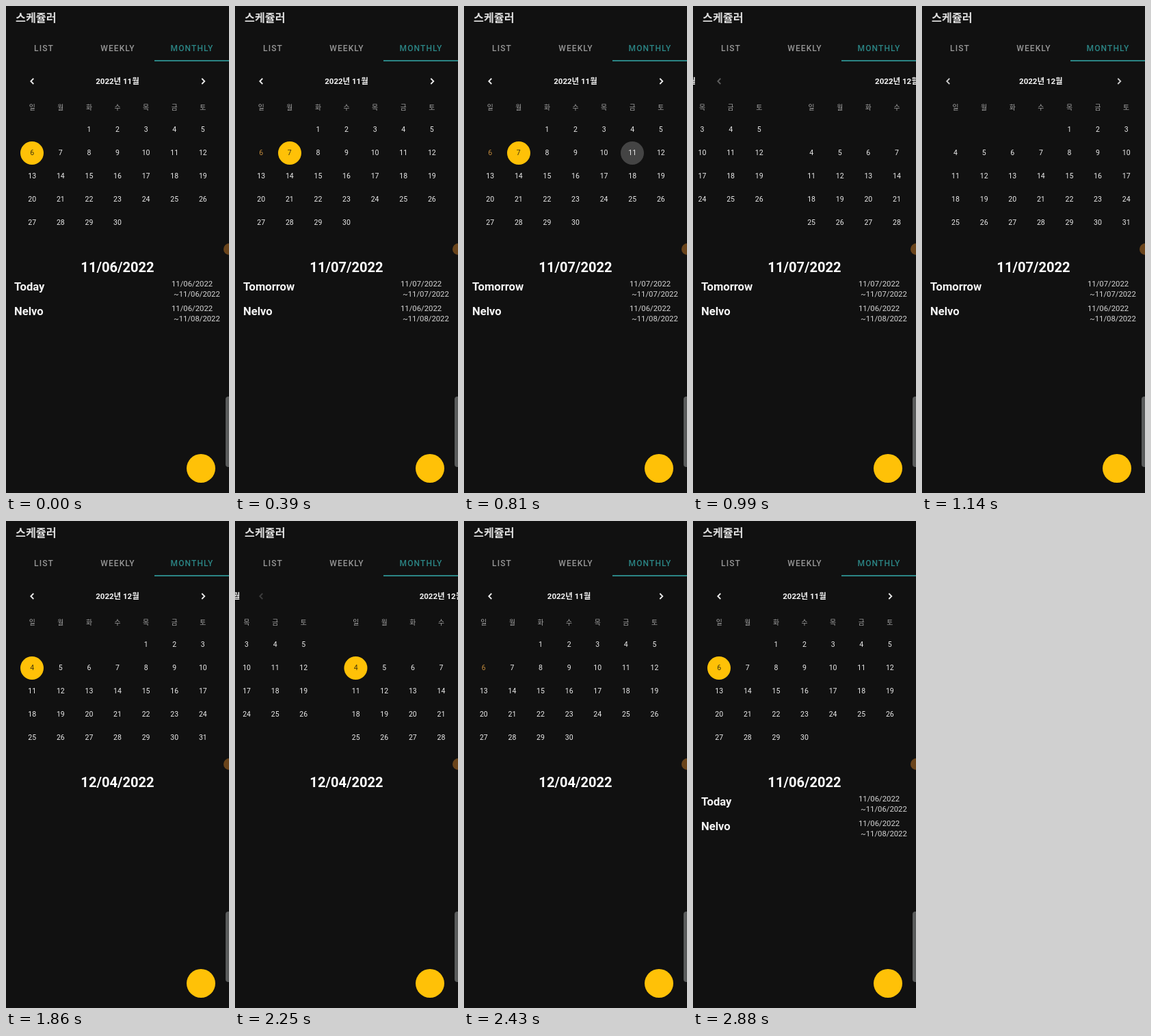
These frames come from a looping animation (326x712 px, 3330 ms). An HTML page:

```html
<!DOCTYPE html>
<html lang="ko">
<head>
<meta charset="utf-8">
<title>스케쥴러</title>
<style>
  html, body { margin: 0; width: 100%; height: 100%; overflow: hidden; background: #111; }
  body {
    --loop: 3330ms;
    --amber: #ffc107;
    --teal: #2b8585;
    position: relative;
    font-family: Roboto, "Noto Sans CJK KR", "Noto Sans CJK", sans-serif;
    color: #f4f4f4;
  }
  #stage { position: absolute; left: 0; top: 0; width: 326px; height: 712px; overflow: hidden; }
  #stage div, .cell, .pick, .press { position: absolute; white-space: nowrap; }

  .app { left: 14px; top: 7px; font-size: 16.2px; line-height: 22px; font-weight: 700; color: #dedede; }
  .tab { top: 52px; width: 109px; line-height: 20px; text-align: center; font-size: 12px; font-weight: 500; letter-spacing: 1.1px; color: #979797; }
  .tab.active { color: var(--teal); }
  .bar { left: 217px; top: 79px; width: 109px; height: 2px; background: var(--teal); }

  .track { left: 0; top: 90px; width: 652px; height: 250px; animation: swipe var(--loop) infinite; }
  .page { top: 0; width: 326px; height: 250px; }
  .month { left: 0; top: 10px; width: 326px; line-height: 20px; text-align: center; font-size: 11.5px; font-weight: 700; }
  .cell { width: 34px; height: 34px; line-height: 34px; text-align: center; font-size: 10.5px; color: #ececec; }
  .cell.name { font-size: 9.8px; color: #a6a6a6; }
  .cell.today { color: #c18a3c; }
  .pick, .press { left: 0; top: 0; width: 34px; height: 34px; border-radius: 50%; }
  .pick { background: var(--amber); color: #40340f; font-weight: 400; }
  .press { background: #444; color: #ececec; font-style: normal; animation: press var(--loop) infinite; }

  .arrows { position: absolute; left: 0; top: 100px; width: 326px; height: 20px; fill: none; stroke: #ededed; stroke-width: 1.8; }
  .arrows path { animation: arrow var(--loop) infinite; }

  .date { left: 0; top: 370px; width: 326px; line-height: 24px; text-align: center; font-size: 20.1px; font-weight: 700; color: #fff; }
  .task { left: 12px; line-height: 20px; font-size: 16.6px; font-weight: 700; }
  .from, .to { line-height: 14px; font-size: 11.3px; color: #d6d6d6; }
  .from { left: 242px; }
  .to { left: 245px; }

  #panels { left: 0; top: 0; }
  .edge { left: 317.5px; top: 346.5px; width: 17px; height: 17px; border-radius: 50%; background: #6a441b; }
  .handle { left: 321px; top: 571px; width: 10px; height: 103px; border-radius: 4px; background: #5a5c5c; }
  .fab { left: 264px; top: 655px; width: 42px; height: 42px; border-radius: 50%; background: var(--amber); }

  .on6 { animation: on6 var(--loop) step-end infinite; }
  .on7 { animation: on7 var(--loop) step-end infinite; }
  .on4 { animation: on4 var(--loop) step-end infinite; }

  @keyframes on6 {
    0% { visibility: visible; }
    10.81% { visibility: hidden; }
    83.784%, 100% { visibility: visible; }
  }
  @keyframes on7 {
    0% { visibility: hidden; }
    10.81% { visibility: visible; }
    42.342%, 100% { visibility: hidden; }
  }
  @keyframes on4 {
    0% { visibility: hidden; }
    42.342% { visibility: visible; }
    83.784%, 100% { visibility: hidden; }
  }
  @keyframes press {
    0%, 22.5% { opacity: 0; }
    23.4%, 25.3% { opacity: 1; }
    27.1%, 100% { opacity: 0; }
  }
  /* drag, fling, settle: once forward, once back */
  @keyframes swipe {
    0%, 25.225% { transform: translateX(0); animation-timing-function: ease-in; }
    28.829% { transform: translateX(-136.5px); animation-timing-function: cubic-bezier(.2, .4, .6, 1); }
    34.234% { transform: translateX(-315px); animation-timing-function: ease-out; }
    37.838%, 63.964% { transform: translateX(-326px); animation-timing-function: ease-in; }
    67.568% { transform: translateX(-189.5px); animation-timing-function: cubic-bezier(.2, .4, .6, 1); }
    72.973% { transform: translateX(-9.5px); animation-timing-function: ease-out; }
    76.577%, 100% { transform: translateX(0); }
  }
  @keyframes arrow {
    0%, 25.225% { opacity: 1; }
    28.829% { opacity: var(--low); }
    34.234% { opacity: .85; }
    37.838%, 63.964% { opacity: 1; }
    67.568% { opacity: var(--low); }
    72.973%, 100% { opacity: 1; }
  }
</style>
</head>
<body>
<div id="stage">
  <div class="app">스케쥴러</div>
  <div class="tab" style="left:1px">LIST</div>
  <div class="tab" style="left:109px">WEEKLY</div>
  <div class="tab active" style="left:217.5px">MONTHLY</div>
  <div class="bar"></div>

  <div class="track" id="track"></div>
  <svg class="arrows" viewBox="0 0 326 20">
    <path style="--low:.2" d="M40.3 6L36.3 10L40.3 14"/>
    <path style="--low:0" d="M286.3 6L290.3 10L286.3 14"/>
  </svg>

  <div id="panels"></div>
  <div class="edge"></div>
  <div class="handle"></div>
  <div class="fab"></div>
</div>
<script>
  const cell = (col, y, text, cls = '', extra = '') =>
    `<span class="cell ${cls}" style="left:${21.2 + 41.6 * col}px;top:${y - 107}px">${text}${extra}</span>`;

  function page(index, month, first, count, picks, held, today) {
    let html = `<div class="month">2022년 ${month}월</div>`;
    [...'일월화수목금토'].forEach((name, col) => html += cell(col, 148.5, name, 'name'));
    for (let day = 1; day <= count; day++) {
      const slot = first + day - 1;
      let extra = picks.includes(day) ? `<b class="pick on${day}">${day}</b>` : '';
      if (day === held) extra += `<i class="press">${day}</i>`;
      html += cell(slot % 7, 181 + 33.9 * Math.floor(slot / 7), day, day === today ? 'today' : '', extra);
    }
    return `<div class="page" style="left:${326 * index}px">${html}</div>`;
  }

  const task = ([name, from, to], row) => {
    const y = 410 + 36 * row;
    return `<div class="task" style="top:${y - 9}px">${name}</div>
      <div class="from" style="top:${y - 10}px">${from}/2022</div>
      <div class="to" style="top:${y + 5}px">~${to}/2022</div>`;
  };

  const panel = (key, date, tasks) =>
    `<div class="on${key}" style="left:0;top:0"><div class="date">${date}/2022</div>${tasks.map(task).join('')}</div>`;

  const trip = ['Nelvo', '11/06', '11/08'];

  document.getElementById('track').innerHTML =
    page(0, 11, 2, 30, [6, 7], 11, 6) + page(1, 12, 4, 31, [4]);
  document.getElementById('panels').innerHTML =
    panel(6, '11/06', [['Today', '11/06', '11/06'], trip]) +
    panel(7, '11/07', [['Tomorrow', '11/07', '11/07'], trip]) +
    panel(4, '12/04', []);
</script>
</body>
</html>
```
